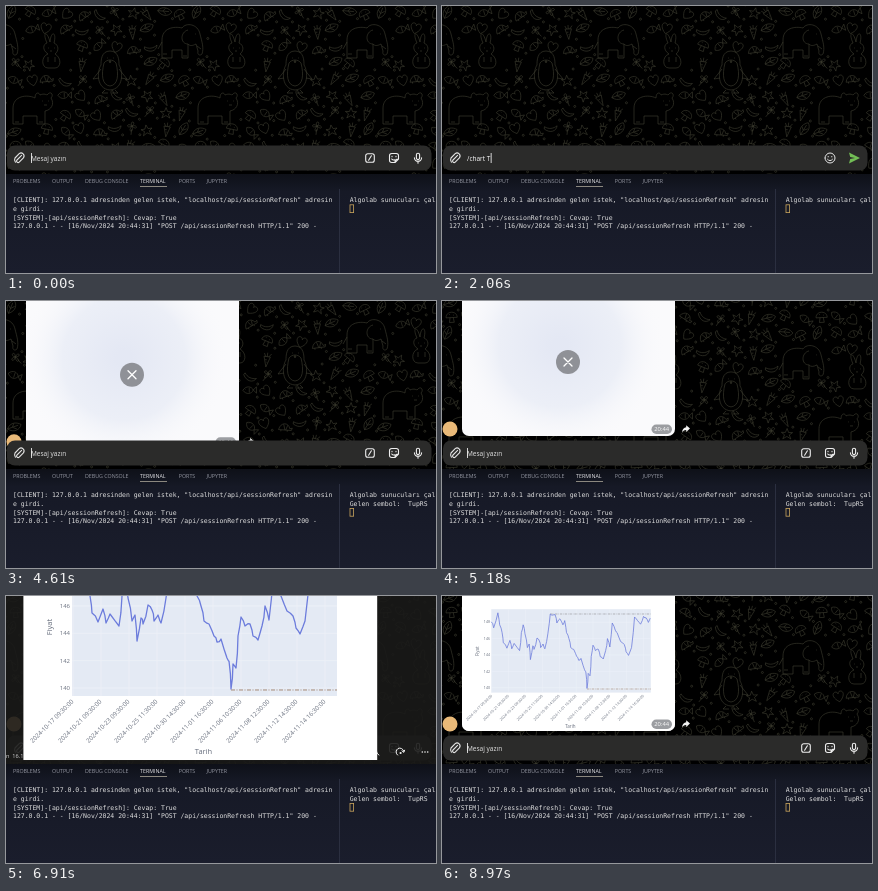
An HTML page with a canvas that plays this animation: 430x267 px, repeating every 9000 ms.

```html
<!DOCTYPE html>
<html lang="tr">
<head>
<meta charset="utf-8">
<title>Chat bot demo</title>
<style>
html, body { margin: 0; width: 100%; height: 100%; overflow: hidden; background: #000; }
canvas { display: block; width: 430px; height: 267px; }
</style>
</head>
<body>
<canvas id="stage"></canvas>
<script>
const W = 430, H = 267, LOOP = 9000, CHAT_H = 168;
const SANS = '"Open Sans", "Noto Sans", sans-serif';
const MONO = '"DejaVu Sans Mono", "Noto Sans Mono", monospace';
const canvas = document.getElementById('stage');
const c = canvas.getContext('2d');
const ratio = Math.max(1, window.devicePixelRatio || 1);
canvas.width = W * ratio;
canvas.height = H * ratio;

const clamp = v => Math.max(0, Math.min(1, v));
const span = (t, a, b) => clamp((t - a) / (b - a));
const smooth = p => p * p * (3 - 2 * p);
const easeOut = p => 1 - (1 - p) ** 3;

function random(seed) {
  return () => (seed = (seed * 16807) % 2147483647) / 2147483647;
}

function text(s, x, y, size, color, family = SANS, align = 'left', weight = 400) {
  c.font = `${weight} ${size}px ${family}`;
  c.textAlign = align;
  c.fillStyle = color;
  c.fillText(s, x, y);
}

function rect(x, y, w, h, color) {
  c.fillStyle = color;
  c.fillRect(x, y, w, h);
}

function box(x, y, w, h, r, color) {
  c.beginPath();
  c.roundRect(x, y, w, h, r);
  c.fillStyle = color;
  c.fill();
}

function disc(x, y, r, color) {
  c.beginPath();
  c.arc(x, y, r, 0, 7);
  c.fillStyle = color;
  c.fill();
}

function icon(d, x, y, color = '#e8e8e8', width = 1) {
  c.save();
  c.translate(x, y);
  c.strokeStyle = color;
  c.lineWidth = width;
  c.lineCap = c.lineJoin = 'round';
  c.stroke(new Path2D(d));
  c.restore();
}

// ---- Wallpaper ----
const TILE_W = 185, TILE_H = 150;
const animals = [
  [176, 36, 'M-20 14V-2C-20-14-8-16 0-14C4-20 16-18 18-8C20 0 22 6 20 12C18 14 15 13 16 9L14 2C10 4 8 4 6 2V16H0V8H-10V16H-20ZM6-12C-2-10-2 2 6 2M13-8h.8M-20 0L-24 7M-19 12h4M1 14h4M15 4l4 3'],
  [45, 48, 'M-3 14C-10 14-10 2-3 0C-9-4-8-10-4-11C-9-22-4-24-1-12C0-24 6-22 3-11C8-9 8-3 4 0C11 4 10 14 4 14ZM-3-6h.8M3-6h.8M-1-3h2M-3 3v5M4 3v5'],
  [104, 65, 'M0-20C9-20 9-10 9-6C13 0 14 18 0 19C-14 18-13 0-9-6C-9-10-9-20 0-20ZM-9-2L-17 8L-11 7M9-2L17 8L11 7M-5 19l-3 3h6M5 19l3 3H2M-6-8C-9 4-8 14 0 15C8 14 9 4 6-8C3-12-3-12-6-8ZM-3-13h.8M3-13h.8M-1-10h2l-1 2Z'],
  [27, 102, 'M-20 16V0C-20-12-6-14 2-10C2-16 6-16 7-13C11-15 14-13 14-13C18-18 21-13 18-10C22-4 18 2 12 3V16H4V8H-10V16ZM9-7h.8M15-7h.8M11-3h3M-18 14h4M6 14h4']
];
const trinkets = [
  'M-7 5C-7-5 2-7 7-6C8 1 2 7-7 5ZM-7 5L4-4M-2 1V-4M-1 1H4',
  'M0-7L2-2L7-2L3 1L5 6L0 3L-5 6L-3 1L-7-2L-2-2Z',
  'M-7-4C-5 5 3 8 8 3C2 3-3 0-5-6Z',
  'M0 7C-9 0-7-6-3-6C-1-6 0-4 0-3C0-4 1-6 3-6C7-6 9 0 0 7Z',
  'M-7 0C-7-9 7-9 7 0ZM-2 0L-3 6H3L2 0M-3-4h1M2-3h1',
  'M-4-4L4-4L0 9ZM-2-4L-4-8M0-4V-9M2-4L5-8M-2 0h2M0 3h1',
  'M0-2C-5-9 6-9 0-2C7-6 8 4 0-2C4 7-6 6 0-2C-8 3-7-7 0-2M0 2V9',
  'M-8 4C-6-6 4-6 6 2L9 1L8 4ZM-5 4V6M3 4V6M-2-3L0 4M3-2L1 4',
  'M-8 0C-4-6 3-5 5 0L9-4V4L5 0C3 5-4 6-8 0ZM-5-1h.6M0-3V3'
];

function makeTile() {
  const tile = new Path2D(), rnd = random(77);
  const put = (d, x, y, turn = 0, size = 1) =>
    tile.addPath(new Path2D(d), new DOMMatrix().translate(x, y).rotate(turn).scale(size));
  animals.forEach(([x, y, d]) => put(d, x, y));
  const blocked = (x, y) => animals.some(([ax, ay]) =>
    [-TILE_W, 0, TILE_W].some(o => Math.hypot(ax + o - x, ay - y) < 23));
  let n = 0;
  for (let y = 8; y < TILE_H; y += 16.6) {
    for (let x = 8; x < TILE_W; x += 16.8) {
      const px = x + rnd() * 5 - 2.5, py = y + rnd() * 5 - 2.5, turn = rnd() * 90 - 45;
      const dotX = px + 8, dotY = py + 7;
      if (!blocked(px, py)) put(trinkets[n++ * 4 % trinkets.length], px, py, turn, .8);
      if (!blocked(dotX, dotY)) put('M-1 0a1 1 0 1 0 2 0a1 1 0 1 0-2 0', dotX, dotY);
    }
  }
  return tile;
}
const tile = makeTile();

function wallpaper(t) {
  rect(0, 0, W, CHAT_H, '#000');
  const shift = 26 * smooth(span(t, 4650, 5200));
  c.strokeStyle = '#414133';
  c.lineWidth = .6;
  for (let i = -1; i < 3; i++) {
    for (let j = -1; j < 2; j++) {
      c.save();
      c.translate(i * TILE_W, j * TILE_H + shift);
      c.stroke(tile);
      c.restore();
    }
  }
}

// ---- Price chart, laid out at viewer size: x 17..371, bottom 164 ----
const path = [
  66,-18, 70,-8, 77,-33, 80,-13, 84,0, 86,17, 92,26, 97,13, 100,27, 104,18, 113,30, 116,0,
  119,-13, 122,2, 126,25, 129,19, 131,45, 135,22, 137,28, 142,9, 146,14, 148,25, 152,19, 155,27,
  160,2, 164,-31, 167,-29, 172,-30, 175,-16, 180,-23, 185,-13, 188,-20, 191,0, 195,10, 198,25, 203,28,
  208,40, 211,46, 215,43, 221,62, 223,65, 225,93, 227,68, 230,72, 232,40, 235,21, 239,30, 244,28,
  247,40, 252,44, 256,30, 259,10, 263,24, 267,-16, 272,-4, 275,0, 281,15, 287,20, 290,32, 294,38,
  299,25, 304,-26, 309,-20, 314,-14, 319,-27, 323,-25, 327,-17, 330,-24
];
const days = ['10-17 09', '10-21 09', '10-23 09', '10-25 11', '10-30 14',
  '11-01 16', '11-06 10', '11-08 12', '11-12 14', '11-14 16'];
const LABEL = '#666d7c', GRID = '#edf1f8';

function priceLine() {
  const rnd = random(5), line = new Path2D();
  line.moveTo(path[0], path[1]);
  for (let i = 2; i < path.length; i += 2) {
    const [x0, y0, x, y] = path.slice(i - 2, i + 2);
    line.lineTo((x0 + x) / 2 + .4, (y0 + y) / 2 + rnd() * 4 - 2);
    line.lineTo(x, y);
  }
  return line;
}
const prices = priceLine();

function level(x, y, color) {
  c.strokeStyle = color;
  c.lineWidth = 1;
  c.setLineDash([4, 1.5, 1, 1.5]);
  c.beginPath();
  c.moveTo(x, y);
  c.lineTo(331, y);
  c.stroke();
  c.setLineDash([]);
}

function turned(s, x, y, angle, size, align) {
  c.save();
  c.translate(x, y);
  c.rotate(angle);
  text(s, 0, 0, size, LABEL, SANS, align);
  c.restore();
}

function chart() {
  rect(17.4, -120, 353.8, 284, '#fff');
  rect(66, -39, 265, 139, '#e4eaf4');
  for (let i = 0; i < 5; i++) {
    const y = 92 - i * 27.35;
    rect(66, y - .4, 265, .8, GRID);
    text(140 + i * 2, 64, y + 2.2, 6, LABEL, SANS, 'right');
  }
  days.forEach((day, i) => {
    const x = 67 + i * 28;
    rect(x - .4, -39, .8, 139, GRID);
    turned(`2024-${day}:30:00`, x + 1, 106, -Math.PI / 4, 6.2, 'right');
  });
  level(164, -31, '#8d8d92');
  level(225, 94, '#a58a78');
  c.strokeStyle = '#6c7cdc';
  c.lineWidth = 1.3;
  c.lineJoin = 'round';
  c.stroke(prices);
  turned('Fiyat', 45.5, 31, -Math.PI / 2, 7.5, 'center');
  text('Tarih', 197.5, 158.5, 7.5, LABEL, SANS, 'center');
}

// ---- Chat ----
function sentMessage(t) {
  if (t < 3390 || t > 4830) return;
  const y = 112 + 27 * (1 - easeOut(span(t, 3390, 3600))) - 152 * easeOut(span(t, 4330, 4830));
  box(351, y, 74, 23, 7, '#2c2c2b');
  text('/chart TupRS', 357, y + 12, 6.6, '#eee');
  text('20:44', 421, y + 19.5, 5, '#999', SANS, 'right');
}

function photo(t) {
  if (t < 4330) return;
  const dy = 152 * (1 - easeOut(span(t, 4330, 4830)));
  const loaded = smooth(span(t, 5240, 5480));
  c.save();
  c.beginPath();
  c.rect(0, 0, W, 150);
  c.clip();
  c.translate(0, dy);
  disc(8, 128, 7.5, '#e9b978');
  c.save();
  c.beginPath();
  c.roundRect(20, -25, 213, 160, 7);
  c.clip();
  rect(20, -25, 213, 160, '#fafafc');
  const haze = c.createRadialGradient(118, 45, 8, 118, 45, 105);
  haze.addColorStop(0, '#e4e8f4');
  haze.addColorStop(.55, '#eceff7');
  haze.addColorStop(1, 'rgba(250,250,252,0)');
  rect(20, -25, 213, 160, haze);
  c.globalAlpha = loaded;
  c.translate(20, 135);
  c.scale(.602, .6);
  c.translate(-17.4, -164);
  chart();
  c.restore();
  if (loaded < 1) {
    c.globalAlpha = 1 - loaded;
    disc(126, 61, 12, '#8f9197');
    icon('M-4-4L4 4M4-4L-4 4', 126, 61, '#fff', 1.3);
    c.globalAlpha = 1;
  }
  box(209.5, 123.5, 20.5, 9.5, 4.75, '#9b9da1');
  text('20:44', 219.7, 130.4, 5.8, '#fff', SANS, 'center');
  c.fillStyle = '#f2f2f2';
  c.fill(new Path2D('M244.2 124.2L248 127.6L244.2 131V129C242 129 241 130 240 131.5C240.3 128 242 126.4 244.2 126.2Z'));
  c.restore();
}

const keys = [[550, '/'], [760, 'c'], [880, 'h'], [1000, 'a'], [1150, 'r'], [1300, 't'], [1420, ' '],
  [2060, 'T'], [2300, 'u'], [2420, 'p'], [2880, 'R'], [3000, 'S']];
const CLIP = 'M2.6-2.6L-2 2A1.5 1.5 0 0 0 .2 4.1L4.4-.2A3 3 0 0 0 .2-4.4L-4 0A4 4 0 0 0-3.6 4.2';
const SMILE = 'M-5 0A5 5 0 1 1 5 0A5 5 0 1 1-5 0M-2.5 1.3Q0 4.2 2.5 1.3M-1.8-1.5v.4M1.8-1.5v.4';
const COMMAND = 'M-2.3-4.3h4.6a2 2 0 0 1 2 2v4.6a2 2 0 0 1-2 2h-4.6a2 2 0 0 1-2-2v-4.6a2 2 0 0 1 2-2M1.4-2.2L-1.4 2.2';
const STICKER = 'M1 4.5H-2.3A2.2 2.2 0 0 1-4.5 2.3V-2.3A2.2 2.2 0 0 1-2.3-4.5H2.3A2.2 2.2 0 0 1 4.5-2.3V1ZM1 4.5Q.7 1 4.5 1M-2-1.7v.5M2-1.7v.5M-2.3 1Q-1 2.5 .7 1.8';
const MIC = 'M-1.6-3.2a1.6 1.6 0 0 1 3.2 0V0a1.6 1.6 0 0 1-3.2 0ZM-3.6-.3a3.6 3.6 0 0 0 7.2 0M0 3.4V5.2';

function inputBar(t) {
  box(1, 139.5, 424.5, 25, 8, '#2b2b2a');
  icon(CLIP, 13, 152, '#e4e4e4', 1.1);
  const typed = t < 3390 ? keys.filter(k => t >= k[0]).map(k => k[1]).join('') : '';
  text(typed || 'Mesaj yazın', 25, 154.6, 6.5, typed ? '#fff' : '#e4e4e4', SANS, 'left', 500);
  const caret = 25 + (typed ? c.measureText(typed).width + .4 : 0);
  if (t < 5240 || t >= 8300) rect(caret, 147, .8, 10, '#fff');
  if (typed) {
    icon(SMILE, 388, 152);
    c.fillStyle = '#72bd55';
    c.fill(new Path2D('M407 146.5L418 152L407 157.5L408.2 153L413 152L408.2 151Z'));
    return;
  }
  [[COMMAND, 364], [STICKER, 388], [MIC, 412]].forEach(([d, x]) => icon(d, x, 152, '#eee', 1.1));
}

// ---- Photo viewer ----
function viewer(t) {
  const shown = smooth(span(t, 6400, 6600)) * (1 - smooth(span(t, 8300, 8500)));
  if (!shown) return;
  const rise = smooth(span(t, 6910, 7970));
  const caption = color => text('n  16.11.2024 saat 20:44', 0, 161.5, 5.6, color);
  c.save();
  c.globalAlpha = shown * .9;
  rect(0, 0, W, CHAT_H, '#1a1a19');
  c.globalAlpha = shown;
  caption('#d8d8d8');
  icon('M-2-2A3 3 0 1 1-2.1-2M.5 1.2L3 3.6', 370, 155.5);
  c.save();
  c.translate(0, -3 * rise);
  chart();
  c.restore();
  c.save();
  c.beginPath();
  c.rect(17, 150, 60, 11);
  c.clip();
  c.globalAlpha = shown * rise;
  caption('#9a9a9a');
  c.restore();
  icon('M-2.4 3.1A3.9 3.9 0 1 1 3.8-.6M1.9-1.2L3.8 .4L4.6-1.8', 394, 156, '#f0f0f0');
  disc(394.6, 157, 1.1, '#f0f0f0');
  [-2.7, 0, 2.7].forEach(x => disc(419 + x, 156, .8, '#f0f0f0'));
  c.restore();
}

// ---- Terminal ----
const tabs = [[7, 'PROBLEMS'], [46, 'OUTPUT'], [79, 'DEBUG CONSOLE'], [134, 'TERMINAL'], [172.8, 'PORTS'], [200.5, 'JUPYTER']];
const log = [
  '[CLIENT]: 127.0.0.1 adresinden gelen istek, "localhost/api/sessionRefresh" adresin',
  'e girdi.',
  '[SYSTEM]-[api/sessionRefresh]: Cevap: True',
  '127.0.0.1 - - [16/Nov/2024 20:44:31] "POST /api/sessionRefresh HTTP/1.1" 200 -'
];

function terminal(t) {
  const back = c.createLinearGradient(0, CHAT_H, 0, H);
  back.addColorStop(0, '#0e1018');
  back.addColorStop(.18, '#161926');
  back.addColorStop(1, '#1a1d2c');
  rect(0, CHAT_H, W, H - CHAT_H, back);
  tabs.forEach(([x, name]) => text(name, x, 177.4, 5.3, name === 'TERMINAL' ? '#e6e6ea' : '#9699a4'));
  rect(134, 180.2, 27, .8, '#a9a496');
  rect(333, 183, 1, H - 183, '#2b2f40');
  const row = (s, x, i) => text(s, x, 196.4 + i * 8.6, 6.48, '#dedede', MONO);
  log.forEach((s, i) => row(s, 7, i));
  row('Algolab sunucuları çalışıyor', 343.7, 0);
  const answered = t >= 3720;
  if (answered) row('Gelen sembol:  TupRS', 343.7, 1);
  c.strokeStyle = '#c9a45c';
  c.lineWidth = .8;
  c.strokeRect(344, answered ? 207.4 : 198.8, 3.6, 7.8);
}

function draw(t) {
  c.setTransform(ratio, 0, 0, ratio, 0, 0);
  c.globalAlpha = 1;
  c.clearRect(0, 0, W, H);
  wallpaper(t);
  sentMessage(t);
  photo(t);
  inputBar(t);
  viewer(t);
  terminal(t);
}

const start = performance.now();
function frame(now) {
  draw(Math.max(0, now - start) % LOOP);
  requestAnimationFrame(frame);
}
draw(0);
requestAnimationFrame(frame);
</script>
</body>
</html>
```
